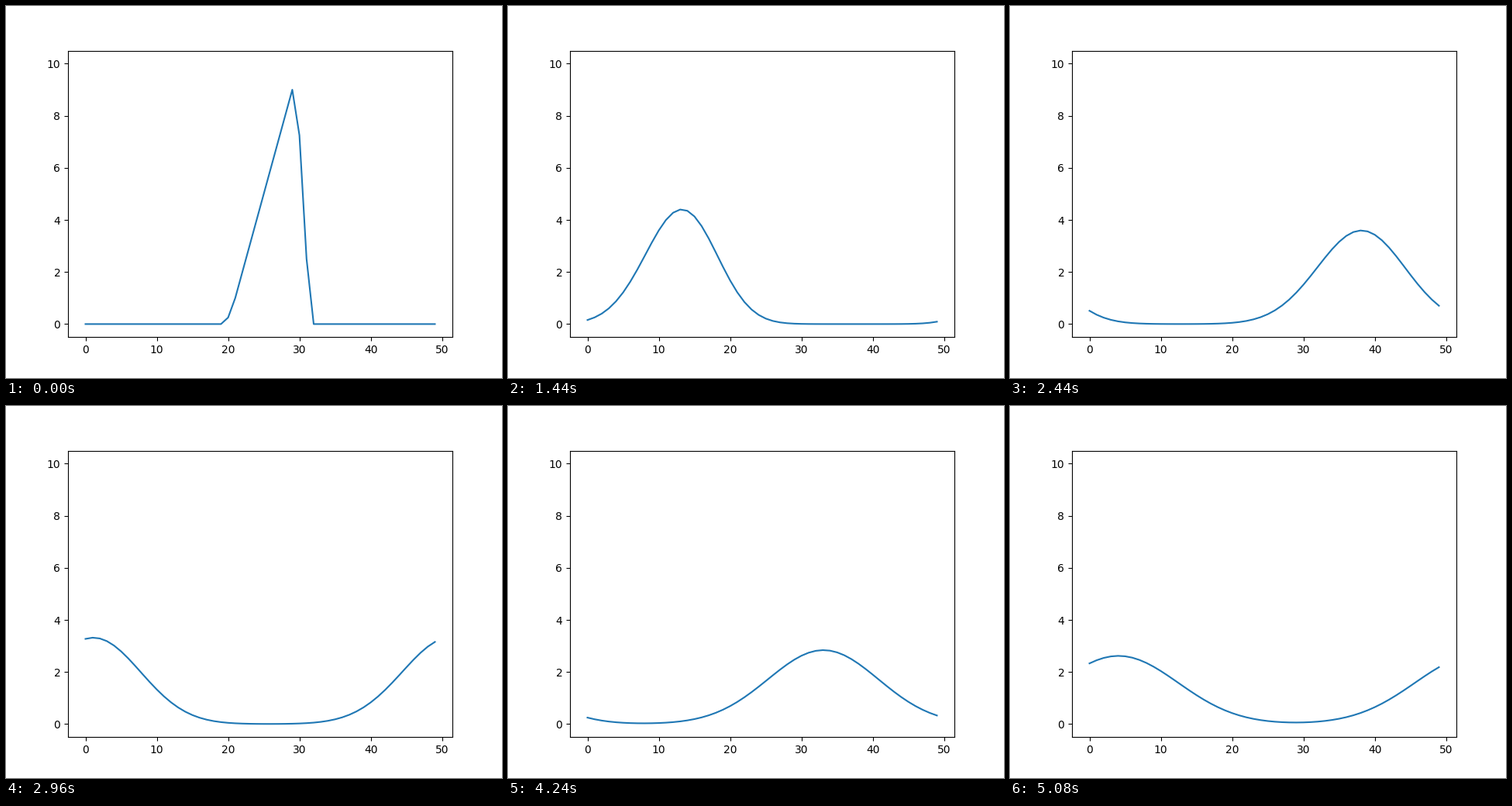
Recreate the animation shown at these times as a matplotlib script. Size 640x480 px, loop 5100 ms.

```python
import numpy as np
import matplotlib.pyplot as plt
from matplotlib.animation import FuncAnimation

CELLS = 50
FRAMES = 255
COURANT = 0.5


def step(u):
    """One upwind advection step on a periodic grid."""
    return u - COURANT * (u - np.roll(u, 1))


x = np.arange(CELLS)
ramp = np.where((x > 19) & (x < 30), x - 19.0, 0.0)

# The first picture already shows two steps.
states = [step(step(ramp))]
while len(states) < FRAMES:
    states.append(step(states[-1]))

fig, ax = plt.subplots(figsize=(6.4, 4.8), dpi=100)
line, = ax.plot(x, states[0], color="tab:blue", linewidth=1.5)
ax.set_xlim(-2.45, 51.45)
ax.set_ylim(-0.5, 10.5)


def update(n):
    line.set_ydata(states[n])
    return line,


anim = FuncAnimation(fig, update, frames=FRAMES, interval=20, repeat=True, repeat_delay=0)

plt.show()
```
